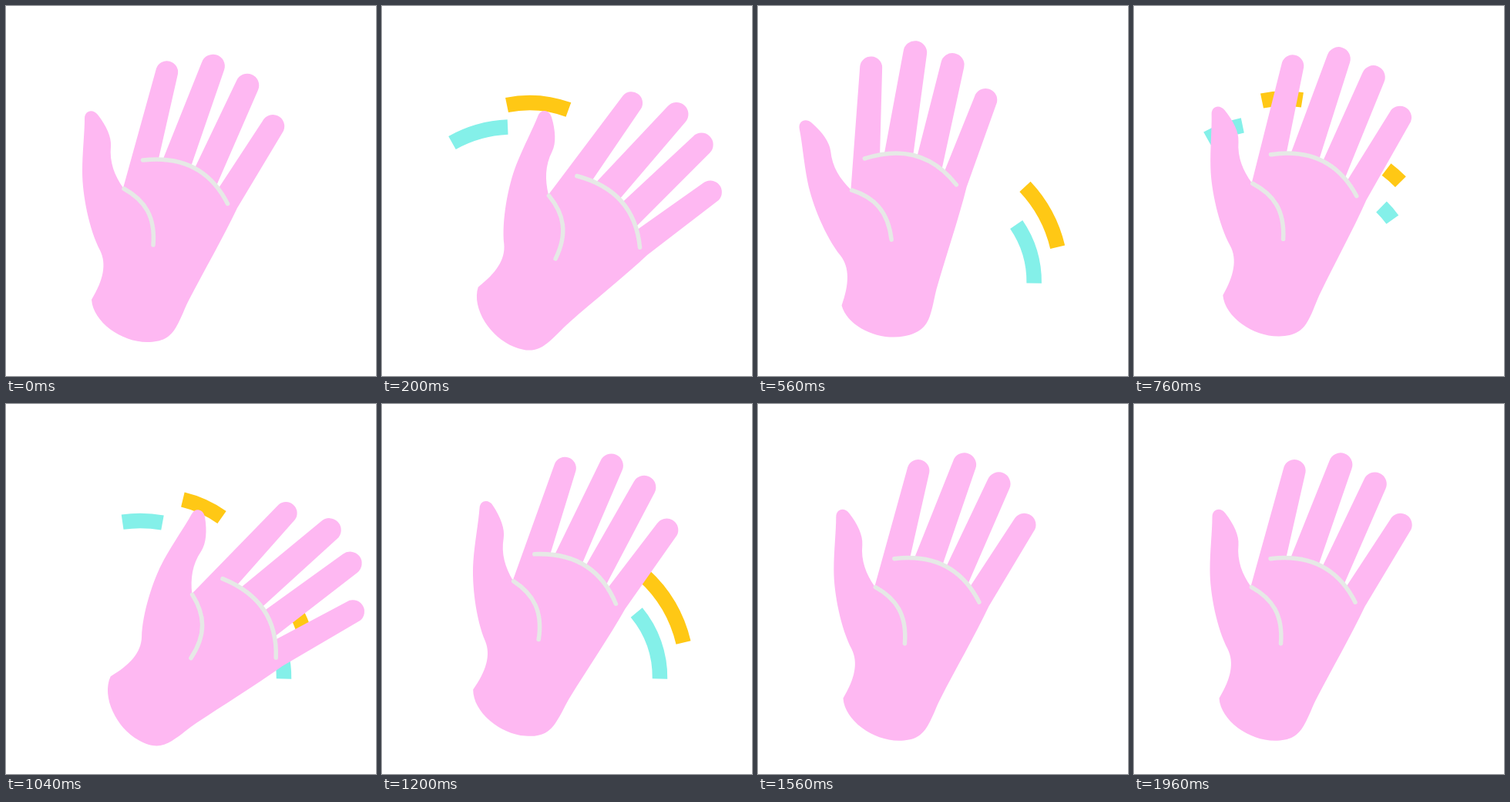
An HTML page for the animation above (2 s loop, 480x480 px).

```html
<!DOCTYPE html>
<html lang="en">
<head>
<meta charset="utf-8">
<title>Waving hand</title>
<style>
  html, body { margin: 0; width: 100%; height: 100%; overflow: hidden; background: #fff; }
  svg { display: block; width: 100%; height: 100%; }
  path { fill: none; }
  .trail { stroke-width: 19.5; }
  .yellow { stroke: #ffc815; }
  .teal { stroke: #84f0e9; }
  .skin { fill: #feb8f2; }
  .crease { stroke: #e6e9e6; stroke-width: 5.5; stroke-linecap: round; }
</style>
</head>
<body>
<svg viewBox="0 0 480 480">
  <g id="trails">
    <path class="trail teal left" pathLength="1" d="M91 177.500A162 162 0 0 1 199 159.500"/>
    <path class="trail yellow left" pathLength="1" d="M162 128.500A146 146 0 0 1 276 152.500"/>
    <path class="trail teal right" pathLength="1" d="M356.500 362A132 132 0 0 0 317 266"/>
    <path class="trail yellow right" pathLength="1" d="M387 315A172 172 0 0 0 323.500 217.500"/>
  </g>
  <g id="hand">
    <path class="skin" d="M152 236L195 81A14.500 14.500 0 0 1 223 88L198 198H204
      L254 73A15 15 0 0 1 283 83L240 208L245 210
      L299 97A15 15 0 0 1 327 109L273 233L276 236
      L333 149A15 15 0 0 1 360 162L300 262
      C282 300 256 345 238 380C232 391 228 404 221 416C213 430 203 436 183 436
      C150 436 113 410 111 381C126 356 131 335 122 317C108 290 99 245 99 215
      C99 190 102 165 102 146C102 135 113 133 119 141C130 155 137 170 136 182
      C134 203 141 220 152 236Z"/>
    <path class="crease" d="M177.500 200C220 195 262 206 287.500 256.500"/>
    <path class="crease" d="M153 237C180 252 194 273 191 310"/>
  </g>
</svg>
<script>
  const LOOP = 2000, STEP = 40, WAVE = 600;
  const trails = document.getElementById('trails');
  const hand = document.getElementById('hand');

  // Eased progress from 0 to 1 between times a and b
  const ease = (t, a, b) => {
    const k = Math.min(1, Math.max(0, (t - a) / (b - a)));
    return (1 - Math.cos(Math.PI * k)) / 2;
  };

  // [time, degrees] turning points of the wave
  const swing = [[0, 0], [352, 35.4], [638, -21], [940, 34.8], [1350, -8.6], [1570, 0]];

  function angle(t) {
    let value = swing[0][1];
    for (let i = 1; i < swing.length; i++) {
      const [from, a] = swing[i - 1], [to, b] = swing[i];
      value += (b - a) * ease(t, from, to);
    }
    return value;
  }

  function trim(side, start, end) {
    const dash = `0 ${start} ${Math.max(0, end - start)} 2`;
    for (const p of document.querySelectorAll(side)) {
      p.setAttribute('stroke-dasharray', dash);
      p.style.display = end - start > 0.005 ? '' : 'none';
    }
  }

  function draw(now) {
    const t = Math.floor(now % LOOP / STEP) * STEP;
    const drift = ease(t, 400, 760) - 1.1 * ease(t, 1240, 1560);
    trails.setAttribute('transform', `translate(${4 * drift} ${-5.5 * drift})`);
    hand.setAttribute('transform',
      `translate(${5 * drift} ${-7 * drift}) rotate(${angle(t)} 161 409)`);

    const l = t < 620 ? t : t - WAVE;
    trim('.left', ease(l, 255, 610), ease(l, 40, 300));
    const r = t < 850 ? t : t - WAVE;
    trim('.right', ease(r, 620, 820), ease(r, 272, 700));
  }

  const begin = performance.now();
  function tick() {
    draw(performance.now() - begin);
    requestAnimationFrame(tick);
  }
  tick();
</script>
</body>
</html>
```
